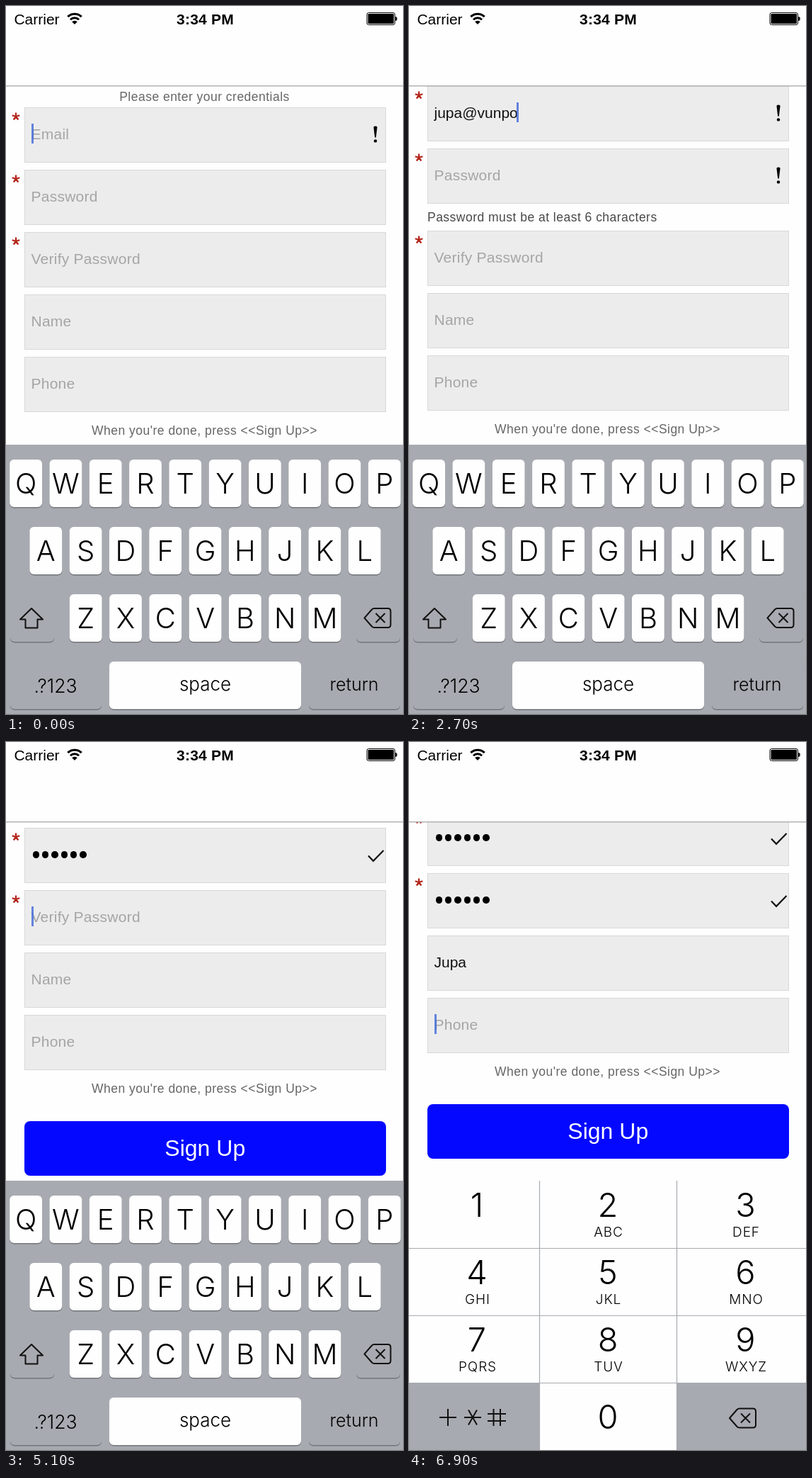
Write an HTML page that moves like this. It is 561 by 999 pixels and loops after 7200 ms.

```html
<!DOCTYPE html>
<html lang="en">
<head>
<meta charset="utf-8">
<title>Sign up form</title>
<style>
  html, body { margin: 0; width: 100%; height: 100%; overflow: hidden; background: #fefefe; }
  body { position: relative; font-family: "Liberation Sans", Arial, sans-serif; }
  #form { position: absolute; top: 113px; left: 0; width: 561px; height: 506px; overflow: hidden; }
  #form > * { position: absolute; box-sizing: border-box; white-space: pre; }
  .note { left: 0; width: 561px; line-height: 24px; font-size: 17.5px; letter-spacing: .48px; color: #666; text-align: center; }
  .error { left: 26px; color: #484848; text-align: left; }
  .field { left: 26px; width: 510.5px; height: 78px; padding-left: 8.5px; border: 1px solid #d8d8d8;
           background: #ececec; font-size: 21px; line-height: 74px; color: #111; }
  .hint { color: #a5a5a5; letter-spacing: .25px; }
  .caret { position: absolute; top: 22px; width: 3px; height: 28px; background: #4a70dc; opacity: .85; }
  .text + .caret { margin-left: -1.5px; }
  .dot { display: inline-block; position: relative; top: -2.5px; width: 9.4px; height: 9.4px; margin: 0 2px; border-radius: 50%; background: #000; }
  .mark { position: absolute; left: -27px; top: -1px; width: 561px; height: 78px; overflow: visible; fill: none; }
  .button { left: 26px; width: 510.5px; height: 77.5px; border-radius: 8px; background: #0408ff; color: #fff;
            font-size: 32px; line-height: 76px; text-align: center; }
  #chrome { position: absolute; left: 0; top: 0; }
  #chrome text { text-anchor: middle; }
  #chrome .status { font-size: 21px; }
  .keys { font-family: Inter, "Liberation Sans", sans-serif; font-weight: 300; }
  .line { fill: none; stroke: #111; stroke-width: 2; stroke-linejoin: round; }
</style>
</head>
<body>
<div id="form"></div>
<svg id="chrome" width="561" height="999" viewBox="0 0 561 999">
  <path d="M0 112.7H561" stroke="#b4b4b6" stroke-width="1.4"/>
  <g class="status">
    <text x="43.5" y="26">Carrier</text>
    <text x="281.5" y="26" font-weight="bold" letter-spacing=".2">3:34 PM</text>
  </g>
  <g fill="none" stroke="#000" stroke-width="3">
    <path d="M87.3 15.2A14 14 0 0 1 106.7 15.2M91 19.3A8.5 8.5 0 0 1 103 19.3"/>
    <path d="M97 26L93.2 22.2A5.4 5.4 0 0 1 100.8 22.2Z" fill="#000" stroke="none"/>
  </g>
  <rect x="510" y="9.5" width="39.5" height="17" rx="2.5" fill="none" stroke="#000"/>
  <rect x="511.5" y="11" width="36.5" height="14" rx="1.2"/>
  <path d="M550.3 15q2.4 0 2.4 3t-2.4 3z"/>
  <g id="letters" class="keys"></g>
  <g id="digits" class="keys"></g>
</svg>
<script>
const GRAY = '#a7aab0';
const STEP = 300;
const get = id => document.getElementById(id);
const label = (x, y, size, s, extra = '') => `<text x="${x}" y="${y}" font-size="${size}" ${extra}>${s}</text>`;
const box = (x, y, w, h, fill, rx = 0) => `<rect x="${x}" y="${y}" width="${w}" height="${h}" rx="${rx}" fill="${fill}"/>`;
const eraser = (x, y) => `<path class="line" transform="translate(${x} ${y})"
  d="M-18.5 0L-8 -12Q-6.5 -13.5 -4.5 -13.5H14.5Q18.5 -13.5 18.5 -9.5V9.5Q18.5 13.5 14.5 13.5H-4.5Q-6.5 13.5 -8 12ZM-2.5 -6.5L10.5 6.5M10.5 -6.5L-2.5 6.5"/>`;

function key(x, y, w, fill) {
  return box(x, y + 1.5, w, 67, '#74777c', 6) + box(x, y, w, 67, fill, 6);
}

function letterKeys() {
  const rows = [['QWERTYUIOP', 5.2, 640], ['ASDFGHJKL', 33.4, 735], ['ZXCVBNM', 89.8, 830]];
  let out = box(0, 619, 561, 380, GRAY);
  for (const [chars, left, y] of rows)
    [...chars].forEach((c, i) => {
      const x = left + i * 56.3;
      out += key(x, y, 45.8, '#fefefe') + label(x + 22.9, y + 48, 40, c);
    });
  return out + key(6, 830, 62, GRAY) + key(495, 830, 62, GRAY) + key(6, 925, 129, GRAY) +
    key(428, 925, 129, GRAY) + key(146, 925, 271, '#fefefe') +
    '<path class="line" d="M36 850L52 865.5H44.5V877.5H27.5V865.5H20Z"/>' + eraser(525, 863.5) +
    label(281.5, 966, 26, 'space') + label(70, 969, 26.5, '.?123') + label(492, 966, 25, 'return');
}

function digitKeys() {
  const columns = [96, 281, 475.5];
  const groups = ['', 'ABC', 'DEF', 'GHI', 'JKL', 'MNO', 'PQRS', 'TUV', 'WXYZ'];
  let out = box(0, 619, 561, 380, '#fefefe') + box(0, 904, 184.5, 95, GRAY) + box(378.5, 904, 183, 95, GRAY) +
    `<path d="M184.5 619V999M378.5 619V999M0 714.5H561M0 809.5H561M0 904.5H561" stroke="${GRAY}" stroke-width="1.2"/>`;
  groups.forEach((group, i) => {
    const x = columns[i % 3], y = 670 + 95 * Math.floor(i / 3);
    out += label(x, y, 47, i + 1) + label(x + 1, y + 28, 19, group, 'letter-spacing=".9"');
  });
  return out + label(281, 968.5, 47, 0) + eraser(471.5, 954) +
    `<path class="line" d="M43 953H67M55 941V965M78 953H102M84 942.5L96 963.5M96 942.5L84 963.5
      M119.5 941V965M129 941V965M111 948H137M111 958H137"/>`;
}

const fields = ['Email', 'Password', 'Verify Password', 'Name', 'Phone'];
const errors = ['The email should look like name@provider.domain', 'Password must be at least 6 characters'];
const marks = {
  bad: '<path d="M519.5 28.5Q519.3 26.5 522 26.5T524.5 28.5L522.8 42.5H521.2Z" fill="#000"/><circle cx="522" cy="47.4" r="2.2" fill="#000"/>',
  ok: '<path d="M512 39.5L519 46.8L533.5 32" stroke="#111" stroke-width="2.2"/>'
};
const star = [0, 1, 2, 3, 4].map(i => {
  const a = i * Math.PI * .4 - Math.PI / 2;
  return `M14 13l${(5.6 * Math.cos(a)).toFixed(2)} ${(5.6 * Math.sin(a)).toFixed(2)}`;
}).join('');

// Each entry holds what changes at that step.
const changes = [
  { scroll: 0, focus: 0, caret: true, error: -1, values: ['', '', '', '', ''], icons: ['bad'] },
  { caret: false },
  { caret: true, 0: 'jupa' },
  {},
  { 0: 'jupa@' },
  { 0: 'jupa@vu' },
  { 0: 'jupa@vunpo' },
  { focus: 1, error: 0, scroll: 50 },
  { focus: 0, error: 1, icons: ['bad', 'bad'] },
  { scroll: 30.5 },
  { caret: false },
  { caret: true, 0: 'jupa@vunpo.com', icons: ['ok', 'bad'] },
  { focus: 1, error: -1, scroll: 22 },
  {},
  { 1: '12' },
  { 1: '1234' },
  { 1: '123456', icons: ['ok', 'ok'] },
  { focus: 2, scroll: 110 },
  { 2: '12', icons: ['ok', 'ok', 'bad'] },
  { 2: '1234' },
  { 2: '123456', icons: ['ok', 'ok', 'ok'] },
  { focus: 3, scroll: 134 },
  { 3: 'Jupa' },
  { focus: 4 }
];
const states = [];
changes.forEach((change, n) => {
  const state = { ...states[n - 1], ...change };
  state.values = state.values.map((v, i) => change[i] ?? v);
  states.push(state);
});

function content(i, { values, focus, caret }) {
  const value = values[i], active = focus === i;
  const secret = i === 1 || i === 2;
  const cursor = active && caret ? '<span class="caret"></span>' : '';
  if (!value) return cursor + `<span class="hint">${fields[i]}</span>`;
  const hidden = secret ? value.length - (active ? 1 : 0) : 0;
  return '<span class="dot"></span>'.repeat(hidden) +
    `<span class="${secret ? 'secret' : 'text'}">${value.slice(hidden)}</span>` + cursor;
}

function formMarkup(state) {
  const note = (y, s, kind = '') => `<div class="note ${kind}" style="top:${y - 12}px">${s}</div>`;
  let y = 30 - state.scroll;
  let out = note(y - 15, 'Please enter your credentials');
  fields.forEach((_, i) => {
    const required = i < 3 ? `<path d="${star}" stroke="#b3261b" stroke-width="2.3"/>` : '';
    out += `<div class="field" style="top:${y}px">${content(i, state)}<svg class="mark">${required}${marks[state.icons[i]] || ''}</svg></div>`;
    if (state.error === i) {
      out += note(y + 97, errors[i], 'error');
      y += 28;
    }
    y += 88;
  });
  return out + note(y + 16, "When you're done, press &lt;&lt;Sign Up&gt;&gt;") +
    `<div class="button" style="top:${y + 61.5}px">Sign Up</div>`;
}

get('letters').innerHTML = letterKeys();
get('digits').innerHTML = digitKeys();
let shown = -1;
function draw(now) {
  const n = Math.floor(now / STEP) % states.length;
  if (n !== shown) {
    shown = n;
    get('form').innerHTML = formMarkup(states[n]);
    get('digits').style.display = states[n].focus === 4 ? '' : 'none';
  }
  requestAnimationFrame(draw);
}
draw(performance.now());
</script>
</body>
</html>
```
